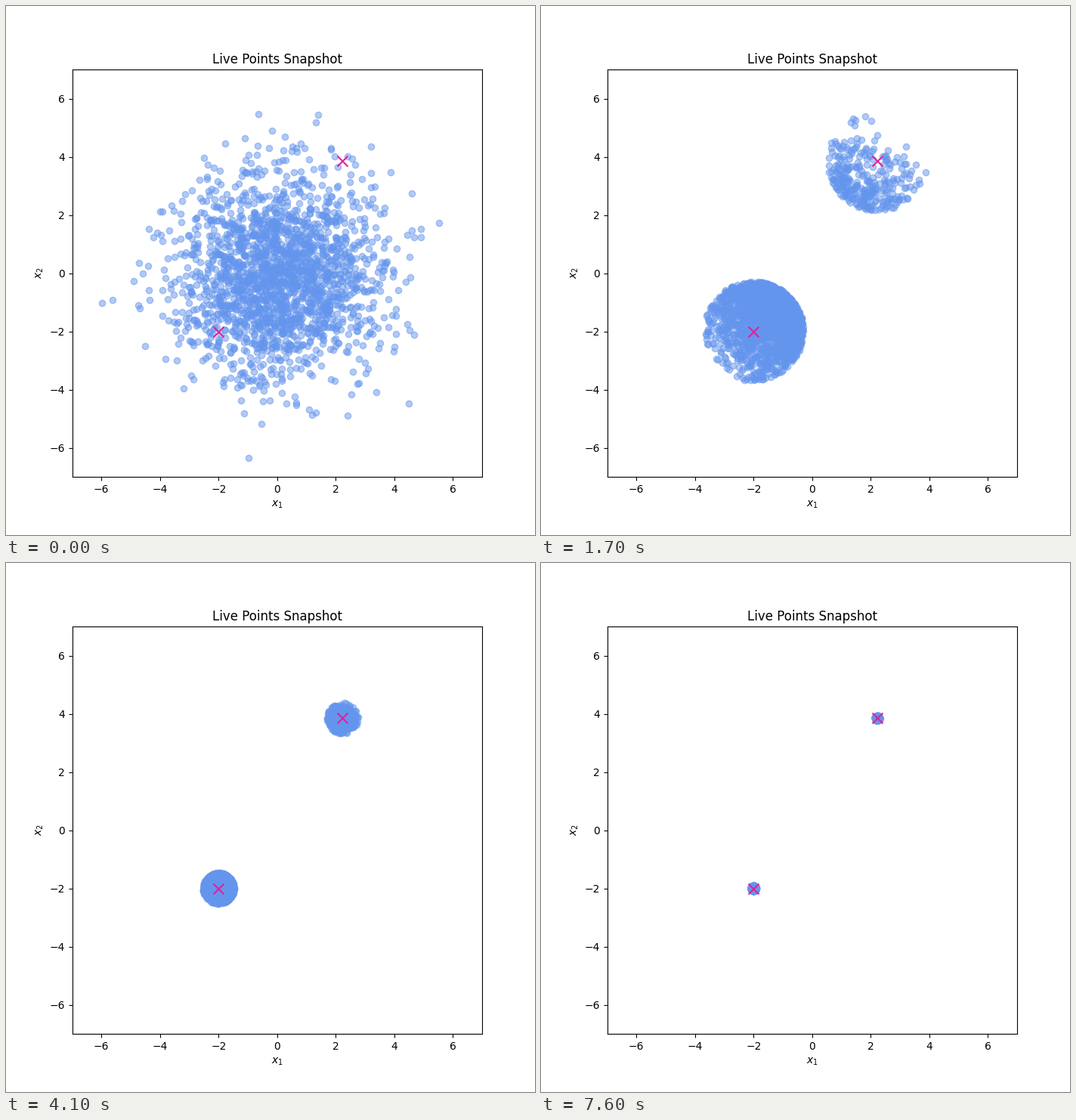
Animation, 700 px wide and 700 px high, one loop 7.7 s. Source, as a matplotlib script:

```python
import numpy as np
import matplotlib.pyplot as plt
from matplotlib.animation import FuncAnimation

FRAMES, INTERVAL = 77, 100
N_LIVE, N_KILL, N_STEPS = 2000, 196, 10
PRIOR_VAR = 3.0
PEAKS = np.array([[-2.0, -2.0], [2.23, 3.85]])


def peak_dist(p):
    """Distance to the nearest likelihood peak."""
    return np.linalg.norm(p[:, None] - PEAKS, axis=2).min(axis=1)


def replace_worst(live, rng):
    """Swap the least likely points for walkers inside the new contour."""
    order = np.argsort(peak_dist(live))
    keep, worst = order[:-N_KILL], order[-N_KILL:]
    radius = peak_dist(live[keep]).max()
    walk = live[rng.choice(keep, N_KILL)]
    for _ in range(N_STEPS):
        trial = walk + rng.normal(0, 0.1 * radius, walk.shape)
        log_ratio = ((walk**2).sum(1) - (trial**2).sum(1)) / (2 * PRIOR_VAR)
        ok = (np.log(rng.random(N_KILL)) < log_ratio) & (peak_dist(trial) < radius)
        walk = np.where(ok[:, None], trial, walk)
    result = live.copy()
    result[worst] = walk
    return result


rng = np.random.default_rng(7)
snapshots = [rng.normal(0, np.sqrt(PRIOR_VAR), (N_LIVE, 2))]
while len(snapshots) < FRAMES:
    snapshots.append(replace_worst(snapshots[-1], rng))

fig, ax = plt.subplots(figsize=(7, 7), dpi=100)
dots = ax.scatter(*snapshots[0].T, color="cornflowerblue", alpha=0.5)
ax.scatter(*PEAKS.T, marker="x", s=100, color="#e0219a", zorder=3)
ax.set(xlim=(-7, 7), ylim=(-7, 7), xlabel="$x_1$", ylabel="$x_2$",
       title="Live Points Snapshot")


def update(i):
    dots.set_offsets(snapshots[i])
    return (dots,)


anim = FuncAnimation(fig, update, frames=FRAMES, interval=INTERVAL,
                     repeat=True, repeat_delay=0)
plt.show()
```
